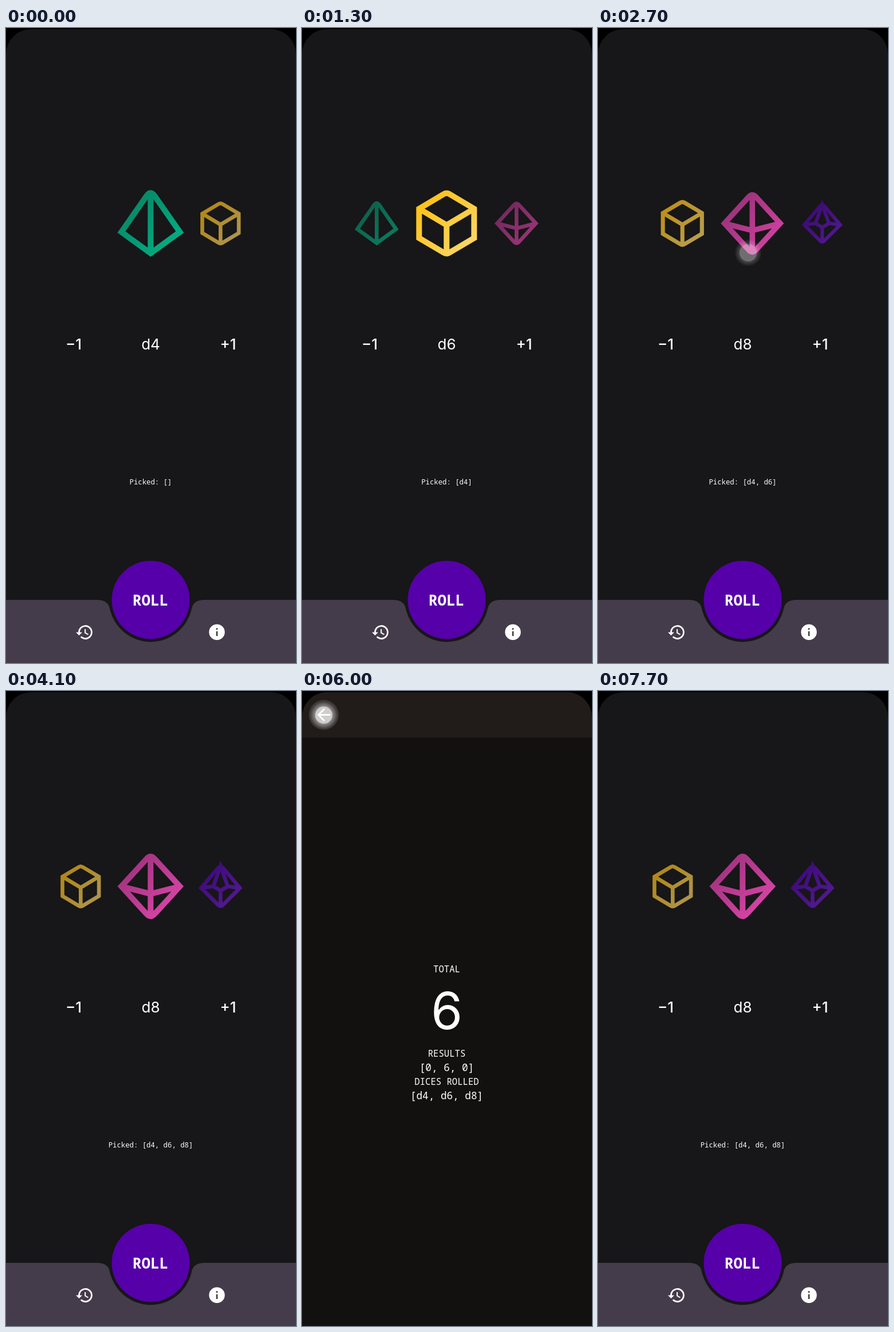
Write an HTML page that moves like this. It is 506 px wide and 1106 px high and loops after 8 s.

```html
<!DOCTYPE html>
<html lang="en">
<head>
<meta charset="utf-8">
<title>Dice roller</title>
<style>
  html, body { margin: 0; width: 100%; height: 100%; overflow: hidden; background: #000; }
  svg { display: block; width: 100%; height: 100%; }
  text { fill: #fff; text-anchor: middle; font-family: "Noto Sans Mono", monospace; }
  .sans { font-family: Inter, sans-serif; font-size: 26px; }
  .step { font-weight: 500; }
  .label { font-size: 15.6px; }
  .list { font-size: 17.7px; }
  .die { fill: none; stroke-width: 10; }
  .icon, .ripple { fill: #fff; }
</style>
</head>
<body>
<svg viewBox="0 0 506 1106">
  <defs id="defs">
    <clipPath id="pager"><rect x="69" y="270" width="367" height="140"/></clipPath>
    <radialGradient id="glow">
      <stop offset=".6" stop-color="#fff" stop-opacity=".45"/>
      <stop offset="1" stop-color="#fff" stop-opacity="0"/>
    </radialGradient>
  </defs>

  <g id="home">
    <rect width="506" height="1106" fill="#171618"/>
    <g id="dice" clip-path="url(#pager)"></g>
    <circle class="ripple" id="addRipple" cx="387.5" cy="550.5" r="28"/>
    <text class="sans step" x="118" y="560">−1</text>
    <text class="sans" id="name" x="252.5" y="560"></text>
    <text class="sans step" x="387.5" y="560">+1</text>
    <text id="picked" x="252.5" y="795" font-size="12.3"></text>
    <path fill="#443c4a" d="M0 996H158Q178 996 181 1011A73 73 0 0 0 324 1011Q327 996 347 996H506V1106H0Z"/>
    <circle cx="252.5" cy="996" r="68" fill="#5600a9"/>
    <circle class="ripple" id="rollRipple" cx="252.5" cy="996" r="68"/>
    <text x="252" y="1006" font-size="26" font-weight="700">ROLL</text>
    <path class="icon" transform="translate(120.6 1036) scale(1.375)" d="M13 3a9 9 0 0 0-9 9H1l3.9 3.9.1.1L9 12H6a7 7 0 1 1 2.06 4.94l-1.42 1.42A9 9 0 1 0 13 3zm-1 5v5l4.28 2.54.72-1.21-3.5-2.08V8z"/>
    <path class="icon" transform="translate(351.5 1035.7) scale(1.375)" d="M12 2a10 10 0 1 0 0 20 10 10 0 0 0 0-20zm1 15h-2v-6h2zm0-8h-2V7h2z"/>
  </g>

  <g id="result">
    <rect width="506" height="1106" fill="#12110f"/>
    <rect width="506" height="81" fill="#211c1a"/>
    <circle class="ripple" id="backRipple" cx="38" cy="41.5" r="26"/>
    <path class="icon" transform="translate(21 24.5) scale(1.42)" d="M20 11H7.83l5.59-5.59L12 4l-8 8 8 8 1.41-1.41L7.83 13H20z"/>
    <text class="label" x="252.5" y="490">TOTAL</text>
    <text class="sans" x="252.5" y="589" style="font-size:89px">6</text>
    <text class="label" x="252.5" y="637">RESULTS</text>
    <text class="list" x="252.5" y="662">[0, 6, 0]</text>
    <text class="label" x="252.5" y="686">DICES ROLLED</text>
    <text class="list" x="252.5" y="711">[d4, d6, d8]</text>
  </g>

  <path d="M0 0H506V46A44 44 0 0 0 462 2H44A44 44 0 0 0 0 46Z"/>
  <g id="finger">
    <circle r="24" fill="url(#glow)"/>
    <circle r="15" fill="#fff" fill-opacity=".55"/>
  </g>
</svg>

<script>
const LOOP = 8000, FRAME = 100, PAGE = 122, MID = 252.3;
const $ = id => document.getElementById(id);
const clamp = v => Math.max(0, Math.min(1, v));
const ramp = (t, from, to) => clamp((t - from) / (to - from));
const easeOut = u => 1 - (1 - u) ** 3;

const DICE = [
  { name: 'd4', from: '#087f60', to: '#03b387',
    d: 'M-7-48L-51 15L0 52L51 15L7-48Q0-58-7-48ZM0-53V52' },
  { name: 'd6', from: '#ffbf0e', to: '#fbd86e',
    d: 'M-5-51L-48-25.5V25.5L-5 51Q0 54 5 51L48 25.5V-25.5L5-51Q0-54-5-51ZM-48-25.5L0 3L48-25.5M0 3V53' },
  { name: 'd8', from: '#963078', to: '#e347ae',
    d: 'M-7-48L-51 0L-7 48Q0 56 7 48L51 0L7-48Q0-56-7-48ZM0-53V53M-51 0L0 13L51 0' },
  { name: 'd10', from: '#4d00a8', to: '#761fd6',
    d: 'M-7-48L-51 4L-7 48Q0 56 7 48L51 4L7-48Q0-56-7-48ZM0-53L-19 0L0 11L19 0ZM-51 4L-19 0M51 4L19 0M0 11V53' }
];

DICE.forEach((die, i) => {
  $('defs').insertAdjacentHTML('beforeend',
    `<linearGradient id="g${i}" x2="1" y2="1"><stop stop-color="${die.from}"/><stop offset="1" stop-color="${die.to}"/></linearGradient>`);
  $('dice').insertAdjacentHTML('beforeend', `<path class="die" stroke="url(#g${i})" d="${die.d}"/>`);
});
const paths = [...$('dice').children];

// Finger contacts; a drag carries the page it starts on.
const ADDS = [100, 1700, 3400], ROLL = 4200, BACK = 5900;
const TOUCHES = [
  ...ADDS.map(down => ({ down, up: down + 100, x: 387, y: 552 })),
  { down: 400, up: 850, x: 302, y: 386, page: 0 },
  { down: 2000, up: 2600, x: 367, y: 386, page: 1 },
  { down: ROLL, up: ROLL + 100, x: 253, y: 1000 },
  { down: BACK, up: BACK + 100, x: 38, y: 42 }
].sort((a, b) => a.down - b.down);

// One swipe: follow the finger, then snap to the next page.
const swipe = (t, start, release) =>
  .76 * ramp(t, start, release) ** 1.5 + .24 * easeOut(ramp(t, release, release + 300));
const position = t => swipe(t, 500, 900) + swipe(t, 2150, 2650);

const ripple = (t, down) =>
  t < down ? 0 : .12 * ramp(t, down - 100, down + 100) * (1 - ramp(t, down + 150, down + 500));

function drawFinger(t, pos) {
  const touch = TOUCHES.filter(e => e.down <= t && t < e.up + 200).pop();
  $('finger').setAttribute('opacity', touch
    ? ramp(t, touch.down - 50, touch.down + 50) * (1 - ramp(t, touch.up, touch.up + 200)) : 0);
  if (!touch) return;
  const moved = 'page' in touch ? pos - touch.page : 0;
  $('finger').setAttribute('transform', `translate(${touch.x - PAGE * moved} ${touch.y + 6.5 * moved})`);
}

function zoom(id, scale, opacity) {
  $(id).setAttribute('transform', `translate(253 553) scale(${scale}) translate(-253 -553)`);
  $(id).setAttribute('opacity', opacity);
}

function draw(t) {
  const pos = position(t);
  paths.forEach((path, i) => {
    const size = Math.max(0, 1 - .337 * Math.abs(i - pos));
    path.setAttribute('transform', `translate(${MID + PAGE * (i - pos)} 340.3) scale(${size})`);
    path.setAttribute('opacity', size);
  });
  const count = ADDS.filter(down => t >= down + 100).length;
  $('name').textContent = DICE[Math.round(pos)].name;
  $('picked').textContent = `Picked: [${DICE.slice(0, count).map(d => d.name).join(', ')}]`;

  $('addRipple').setAttribute('opacity', Math.max(...ADDS.map(down => ripple(t, down))));
  $('rollRipple').setAttribute('opacity', ripple(t, ROLL));
  $('backRipple').setAttribute('opacity', ripple(t, BACK));

  const open = easeOut(ramp(t, 4350, 4700)) * (1 - easeOut(ramp(t, 6000, 6300)));
  zoom('home', 1 + .05 * open, 1);
  zoom('result', .88 + .12 * open, clamp(open * 1.6));
  drawFinger(t, pos);
}

const begin = performance.now();
function tick(now) {
  const t = Math.max(0, now - begin) % LOOP;
  draw(Math.floor(t / FRAME) * FRAME);
  requestAnimationFrame(tick);
}
draw(0);
requestAnimationFrame(tick);
</script>
</body>
</html>
```
